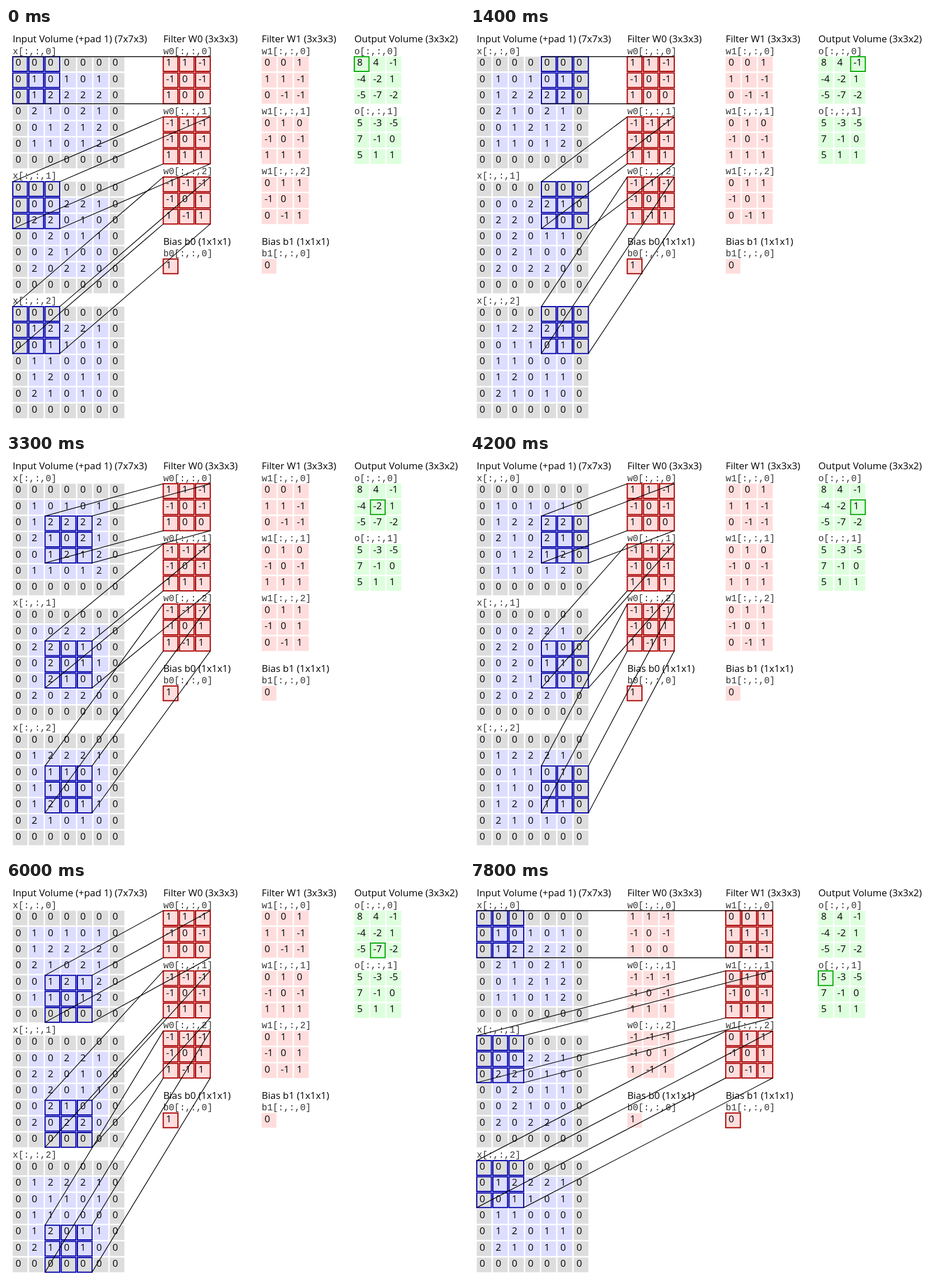
Animation, 802 px wide and 699 px high, one loop 8 s. Source, as an HTML page:

```html
<!DOCTYPE html>
<html lang="en">
<head>
<meta charset="utf-8">
<title>Convolution demo</title>
<style>
  html, body { margin: 0; width: 100%; height: 100%; overflow: hidden; background: #fff; }
  svg { display: block; }
  text { font: 16.9px "Open Sans", "Noto Sans", sans-serif; fill: #000; white-space: pre; }
  .label { font: 16px "Liberation Mono", "Courier New", monospace; fill: #333; }
  .box { fill: none; stroke-width: 2; }
  .link { stroke: #000; stroke-width: 1.25; }
</style>
</head>
<body>
<svg id="stage" width="802" height="699" viewBox="0 0 802 699">
  <g id="base"></g>
  <g id="marks"></g>
</svg>
<script>
const PITCH = 28.3, CELL = 25.7, SPAN = 2 * PITCH + CELL;
const TOP = 50.3, IN_STEP = 218.9, STEP = 105.4, BIAS_Y = 404.7;
const IN_X = 11.8, FILTER_X = [275.4, 447.8], OUT_X = 609.9;
const LOOP = 8000;

const inputs = [
  ["10101", "12222", "21021", "01212", "11012"],
  ["00221", "22010", "02011", "02100", "20220"],
  ["12221", "01101", "11000", "12011", "21010"]
];
const filters = [
  ["1 1 -1/-1 0 -1/1 0 0", "-1 -1 -1/-1 0 -1/1 1 1", "-1 -1 -1/-1 0 1/1 -1 1"],
  ["0 0 1/1 1 -1/0 -1 -1", "0 1 0/-1 0 -1/1 1 1", "0 1 1/-1 0 1/0 -1 1"]
];
const outputs = ["8 4 -1/-4 -2 1/-5 -7 -2", "5 -3 -5/7 -1 0/5 1 1"];
const biases = ["1", "0"];

const base = document.getElementById("base");
const marks = document.getElementById("marks");

function add(parent, tag, attrs, text) {
  const el = document.createElementNS("http://www.w3.org/2000/svg", tag);
  for (const key in attrs) el.setAttribute(key, attrs[key]);
  if (text !== undefined) el.textContent = text;
  parent.appendChild(el);
}

const title = (x, y, text) => add(base, "text", { x, y: y - 25.2 }, text);
const parse = s => s.split("/").map(row => row.split(" "));

function grid(x, y, label, rows, color) {
  add(base, "text", { x, y: y - 4.8, class: "label" }, label);
  rows.forEach((row, r) => row.forEach((value, c) => {
    const cx = x + c * PITCH, cy = y + r * PITCH;
    add(base, "rect", { x: cx, y: cy, width: CELL, height: CELL, fill: color(r, c) });
    add(base, "text", { x: cx + 4.9, y: cy + 16 }, value);
  }));
}

function buildBase() {
  title(IN_X, TOP, "Input Volume (+pad 1) (7x7x3)");
  const inputColor = (r, c) => r % 6 && c % 6 ? "#ddf" : "#ddd";
  inputs.forEach((inner, d) => {
    const edge = "0000000";
    const rows = [edge, ...inner.map(s => "0" + s + "0"), edge].map(s => [...s]);
    grid(IN_X, TOP + d * IN_STEP, `x[:,:,${d}]`, rows, inputColor);
  });

  const pink = () => "#fdd", green = () => "#dfd";
  filters.forEach((slices, f) => {
    const x = FILTER_X[f];
    title(x, TOP, `Filter W${f} (3x3x3)`);
    slices.forEach((s, d) => grid(x, TOP + d * STEP, `w${f}[:,:,${d}]`, parse(s), pink));
    title(x, BIAS_Y, `Bias b${f} (1x1x1)`);
    grid(x, BIAS_Y, `b${f}[:,:,0]`, [[biases[f]]], pink);
  });

  title(OUT_X, TOP, "Output Volume (3x3x2)");
  outputs.forEach((s, d) => grid(OUT_X, TOP + d * STEP, `o[:,:,${d}]`, parse(s), green));
}

const box = (x, y, stroke) =>
  add(marks, "rect", { x, y, width: CELL, height: CELL, stroke, class: "box" });

function boxes(x, y, stroke) {
  for (let i = 0; i < 9; i++)
    box(x + i % 3 * PITCH, y + Math.floor(i / 3) * PITCH, stroke);
}

function drawMarks(step) {
  marks.replaceChildren();
  const f = Math.floor(step / 9), col = step % 3, row = Math.floor(step % 9 / 3);
  const fx = FILTER_X[f], x = IN_X + 2 * col * PITCH;
  const links = [];
  for (let d = 0; d < 3; d++) {
    const y = TOP + d * IN_STEP + 2 * row * PITCH, fy = TOP + d * STEP;
    boxes(x, y, "#00a");
    boxes(fx, fy, "#a00");
    for (const dx of [0, SPAN])
      for (const dy of [0, SPAN])
        links.push({ x1: x + dx, y1: y + dy, x2: fx + dx, y2: fy + dy, class: "link" });
  }
  box(fx, BIAS_Y, "#a00");
  box(OUT_X + col * PITCH, TOP + f * STEP + row * PITCH, "#0a0");
  links.forEach(link => add(marks, "line", link));
}

function stepAt(t) {
  if (t < 500) return 0;
  if (t < 1400) return 1;
  if (t < 2400) return 2;
  return 3 + Math.floor((t - 2400) / 900);
}

let shown = -1;
const start = performance.now();

function tick() {
  const step = stepAt((performance.now() - start) % LOOP);
  if (step !== shown) drawMarks(shown = step);
  requestAnimationFrame(tick);
}

buildBase();
tick();
</script>
</body>
</html>
```
